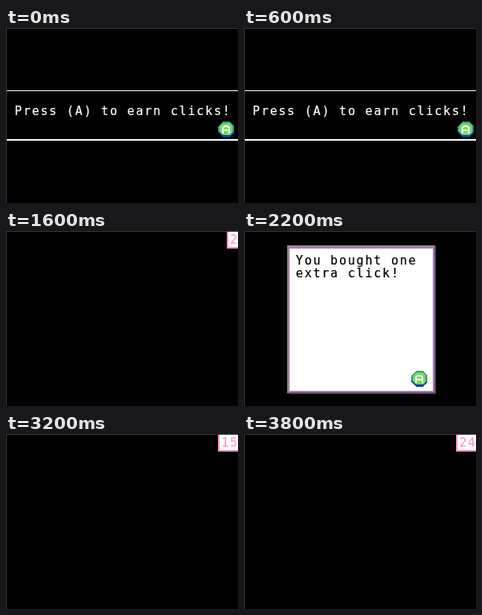
An HTML page that plays this animation: 290x219 px, repeating every 3900 ms.

```html
<!DOCTYPE html>
<html lang="en">
<head>
<meta charset="utf-8">
<title>Click game</title>
<style>
html, body { margin: 0; width: 100%; height: 100%; overflow: hidden; background: #000; }
svg { display: block; width: 290px; height: 219px; }
rect, #button { shape-rendering: crispEdges; }
text {
  font: 15px "DejaVu Sans Mono", "Liberation Mono", monospace;
  letter-spacing: 1.8px;
  white-space: pre;
  stroke-width: .2px;
}
.light { fill: #fff; stroke: #fff; }
.dark { fill: #000; stroke: #000; }
.pink { fill: #ff93c4; stroke: #ff93c4; }
</style>
</head>
<body>
<svg viewBox="0 0 290 219">
  <rect width="290" height="219" fill="#000"/>
  <path d="M0 .5H290M.5 0V219" stroke="#383838"/>

  <g id="splash">
    <rect x="1" y="78" width="289" height="1" fill="#fff"/>
    <rect x="1" y="139" width="289" height="2" fill="#fff"/>
    <text class="light" x="10.8" y="108.8">Press (A) to earn clicks!</text>
  </g>

  <g id="score">
    <rect id="edge" y="1" height="21" fill="#ff93c4"/>
    <rect id="plate" y="1" height="19" fill="#fff"/>
    <text id="digits" class="pink" y="16"></text>
  </g>

  <g id="dialog">
    <rect x="54" y="18" width="185" height="185" fill="#a4839f"/>
    <path d="M239 20V203H56" fill="none" stroke="#5c406c" stroke-width="2"/>
    <rect x="57" y="22" width="179" height="178" fill="#fff"/>
    <text class="dark" x="64.8" y="41.8">You bought one</text>
    <text class="dark" x="64.8" y="58.2">extra click!</text>
  </g>

  <g id="button">
    <path d="M-4 -10H4L10 -4V4L4 10H-4L-10 4V-4Z" fill="#249ca3"/>
    <path d="M-10 2V4L-4 10H4L10 4V2L5 7H-5Z" fill="#003fad"/>
    <path d="M-4 -8H4L8 -4V3L4 7H-4L-8 3V-4Z" fill="#78dc52"/>
    <path d="M-4 5V-2L-2 -4H2L4 -2V5M-4 1H4" fill="none" stroke="#fff" stroke-width="2"/>
  </g>
</svg>
<script>
const LOOP = 3900;
const $ = id => document.getElementById(id);
const show = (id, on) => { $(id).style.display = on ? "" : "none"; };

// Points gained per click rise with each purchase.
const runs = [
  { from: 1000, to: 1400, first: 14, gain: 1 },
  { from: 1400, to: 2200, first: 0, gain: 2, last: 2 },
  { from: 3200, to: LOOP, first: 15, gain: 3 }
];

function scoreAt(t) {
  const run = runs.find(r => t >= r.from && t < r.to);
  if (!run) return null;
  const value = run.first + run.gain * Math.floor((t - run.from) / 200);
  return Math.min(value, run.last ?? Infinity);
}

function drawScore(value) {
  show("score", value !== null);
  if (value === null) return;
  const label = String(value);
  const left = 287 - 11 * label.length;
  $("edge").setAttribute("x", left);
  $("edge").setAttribute("width", 290 - left);
  $("plate").setAttribute("x", left + 2);
  $("plate").setAttribute("width", 288 - left);
  $("digits").setAttribute("x", 290.8 - 10.83 * label.length);
  $("digits").textContent = label;
}

function draw(t) {
  const splash = t < 1000;
  const dialog = t >= 2200 && t < 3200;
  show("splash", splash);
  show("dialog", dialog);
  show("button", splash || dialog);
  drawScore(scoreAt(t));

  const nudged = splash ? t >= 600 || (t >= 200 && t < 400) : t >= 3000;
  const x = (splash ? 275 : 219) + (nudged ? 2 : 0);
  $("button").setAttribute("transform", `translate(${x} ${splash ? 127 : 185})`);
}

const start = performance.now();
function tick() {
  draw((performance.now() - start) % LOOP);
  requestAnimationFrame(tick);
}
draw(0);
requestAnimationFrame(tick);
</script>
</body>
</html>
```
